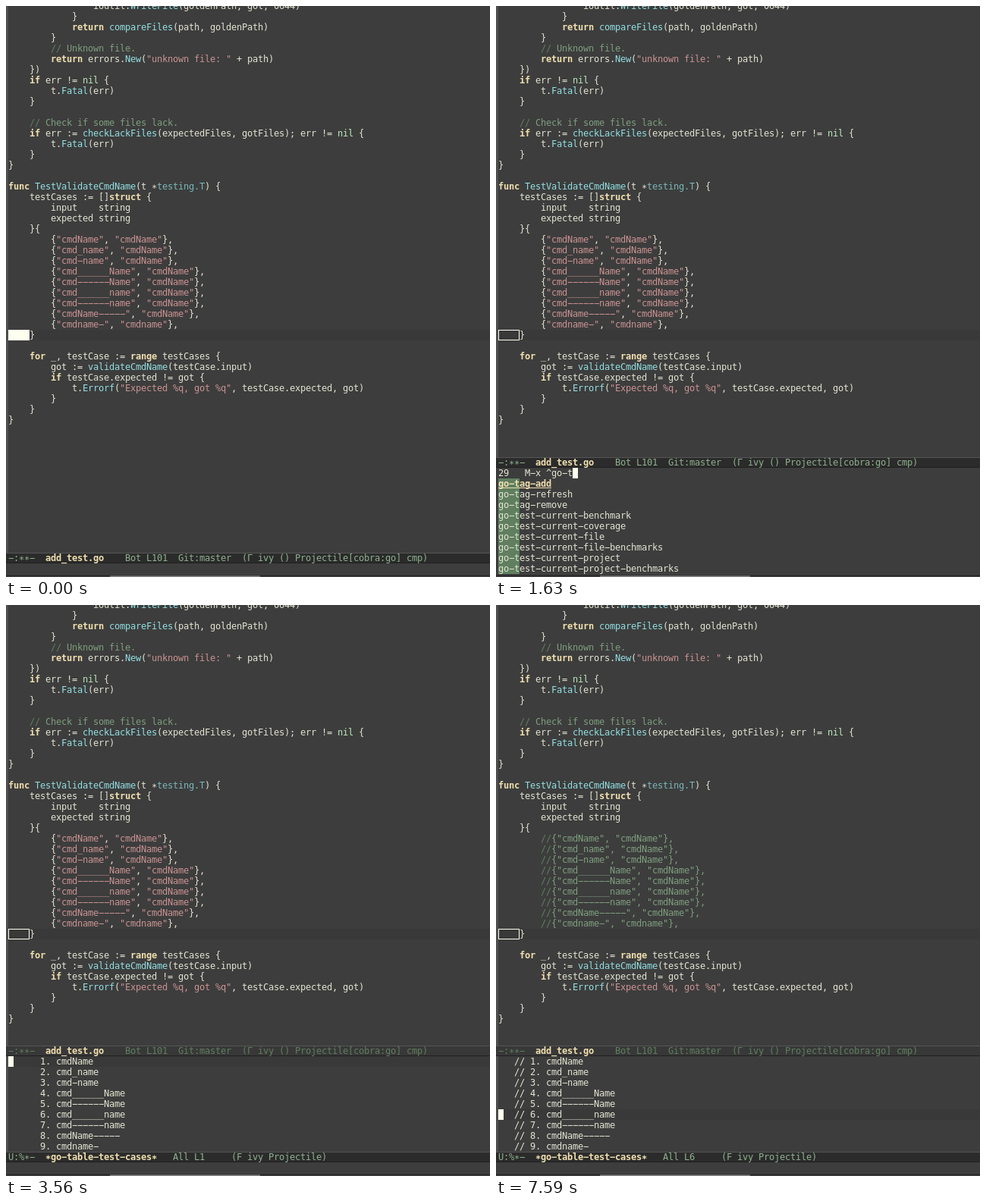
An HTML page with a canvas for the animation above (8 s loop, 638 px wide and 753 px high).

```html
<!DOCTYPE html>
<html lang="en">
<head>
<meta charset="utf-8">
<style>
  html, body { margin: 0; width: 100%; height: 100%; overflow: hidden; background: #3d3d3d; }
  canvas { display: block; }
</style>
</head>
<body>
<canvas id="stage" width="638" height="753"></canvas>
<script>
const ctx = document.getElementById('stage').getContext('2d');
const LOOP = 8000, WIDTH = 638, LEFT = 3, CELL = 7, LINE = 14;

const color = {
  bg: '#3d3d3d', currentLine: '#393939', fringe: '#4f4f4f',
  text: '#e4e4d4', cursor: '#ffffef', keyword: '#f0dfaf', string: '#cc9393',
  func: '#93e0e3', type: '#7cb8bb', constant: '#bfebbf',
  comment: '#7f9f7f', delimiter: '#5f7f5f', match: '#5f7f5f',
  mode: '#8fb28f', modeBg: '#2b2b2b', idle: '#5f7f5f', idleBg: '#383838'
};

const cases = [
  ['cmdName', 'cmdName'], ['cmd_name', 'cmdName'], ['cmd-name', 'cmdName'],
  ['cmd______Name', 'cmdName'], ['cmd------Name', 'cmdName'],
  ['cmd______name', 'cmdName'], ['cmd------name', 'cmdName'],
  ['cmdName-----', 'cmdName'], ['cmdname-', 'cmdname']
];

const codeBefore = `                ioutil.WriteFile(goldenPath, got, 0644)
            }
            return compareFiles(path, goldenPath)
        }
        // Unknown file.
        return errors.New("unknown file: " + path)
    })
    if err != nil {
        t.Fatal(err)
    }

    // Check if some files lack.
    if err := checkLackFiles(expectedFiles, gotFiles); err != nil {
        t.Fatal(err)
    }
}

func TestValidateCmdName(t *testing.T) {
    testCases := []struct {
        input    string
        expected string
    }{`.split('\n');

const codeAfter = `    }

    for _, testCase := range testCases {
        got := validateCmdName(testCase.input)
        if testCase.expected != got {
            t.Errorf("Expected %q, got %q", testCase.expected, got)
        }
    }
}`.split('\n');

const commandLists = {
  all: ['2C-associate-buffer', '2C-two-columns (C-x 6 2, C-x 6 s, <f2> 2, <f2> s)', '5x5',
    '5x5-crack', '5x5-crack-mutating-best', '5x5-crack-mutating-current',
    '5x5-crack-randomly', '5x5-crack-xor-mutate', 'Buffer-menu'],
  go: ['go-add-tags', 'go-coverage', 'go-download-play', 'go-eldoc-setup',
    'go-fill-struct (C-c C-s)', 'go-gen-test-all', 'go-gen-test-dwim',
    'go-gen-test-exported', 'go-goto-arguments (C-c C-f a)'],
  test: ['go-tag-add', 'go-tag-refresh', 'go-tag-remove', 'go-test-current-benchmark',
    'go-test-current-coverage', 'go-test-current-file', 'go-test-current-file-benchmarks',
    'go-test-current-project', 'go-test-current-project-benchmarks'],
  table: ['go-ttest (C-c C-t C-t)', ...['add-case', 'comment-all-case', 'comment-case',
    'delete-all-case', 'delete-case', 'only-case', 'uncomment-all-case', 'uncomment-case']
    .map(name => 'go-ttest--buf-' + name)]
};

// Each entry: start time, typed text, match count, command list
const typing = [
  [440, '', 5643, 'all'], [1330, 'go', 106, 'go'], [1480, 'go-', 102, 'go'],
  [1630, 'go-t', 29, 'test'], [1780, 'go-tt', 16, 'table'],
  [1930, 'go-tte', 16, 'table'], [2080, 'go-ttest', 16, 'table']
];

// Each entry: start time, selected line of the case list
const moves = [
  [2370, 1], [3420, 2], [3560, 1], [4160, 2], [4610, 3], [4750, 4],
  [4900, 5], [5640, 6], [5790, 8], [7440, 7], [7590, 6]
];

const commentTime = { 2: 4310, 5: 5340, 8: 6090 };
const isCommented = (n, t) => t >= (commentTime[n] || 6840);
const latest = (steps, t) => steps.filter(step => step[0] <= t).pop();
const rowY = row => row * LINE - 7;
const colX = col => LEFT + col * CELL;

function rect(x, y, w, h, fill) {
  ctx.fillStyle = fill;
  ctx.fillRect(x, y, w, h);
}

// Puts text on the character grid and returns the column after it.
function put(text, col, y, fill = color.text, bold = false) {
  ctx.font = (bold ? 'bold ' : '') + '12px "DejaVu Sans Mono", monospace';
  ctx.fillStyle = fill;
  for (const ch of text) {
    const glyph = ch === '-' ? '\u2212' : ch === '*' ? '\u2217' : ch;
    if (ch !== ' ') ctx.fillText(glyph, colX(col), y + 11);
    col++;
  }
  return col;
}

const tokens = /(\/\/ ?)(.*)|("[^"]*")|\b(func|if|for|range|struct|return)\b|\b(nil)\b|(testing\.T)|(\w+)(?=\()/g;

function putCode(line, y) {
  let end = 0;
  for (const m of line.matchAll(tokens)) {
    put(line.slice(end, m.index), end, y);
    end = m.index + m[0].length;
    if (m[1]) {
      const col = put(m[1], m.index, y, color.delimiter);
      put(m[2], col, y, color.comment);
    } else {
      const fill = m[3] ? color.string : m[4] ? color.keyword : m[5] ? color.constant
        : m[6] ? color.type : color.func;
      put(m[0], m.index, y, fill, Boolean(m[4]));
    }
  }
  put(line.slice(end), end, y);
}

function modeLine(y, status, name, rest, active = true) {
  const fill = active ? color.mode : color.idle;
  rect(0, y, WIDTH, LINE, active ? color.modeBg : color.idleBg);
  rect(0, y, WIDTH, 1, '#555555');
  rect(0, y + LINE - 1, WIDTH, 1, '#202020');
  put(status, 0, y, fill);
  const col = put(name, 7, y, color.keyword, true);
  put(rest, col, y, fill);
}

function fileModeLine(y, active) {
  modeLine(y, '-:**-', 'add_test.go',
    '    Bot L101  Git:master  (Γ ivy () Projectile[cobra:go] cmp)', active);
}

function drawCode(t) {
  rect(LEFT, 427, WIDTH - LEFT, LINE, color.currentLine);
  const rows = cases.map(([input, expected], i) =>
    `        ${isCommented(i + 1, t) ? '//' : ''}{"${input}", "${expected}"},`);
  [...codeBefore, ...rows, ...codeAfter].forEach((line, i) => putCode(line, rowY(i)));
  if (t < 290) {
    rect(LEFT, 427, 4 * CELL, LINE, color.cursor);
  } else {
    ctx.strokeStyle = color.cursor;
    ctx.lineWidth = 1;
    ctx.strokeRect(LEFT + .5, 427.5, 4 * CELL - 1, LINE - 1);
  }
}

function drawCommands(t) {
  const [, typed, count, list] = latest(typing, t);
  fileModeLine(595, true);
  const end = put(String(count).padEnd(5) + 'M-x ^' + typed, 0, 609);
  if (t < 880 || t >= 1330) rect(colX(end), 609, CELL, LINE, color.cursor);
  commandLists[list].forEach((command, i) => {
    const y = 623 + i * LINE;
    rect(LEFT, y, typed.length * CELL, LINE, color.match);
    if (i === 0) {
      put(command, 0, y, color.keyword, true);
      rect(LEFT, y + 12, command.length * CELL, 1, color.keyword);
      return;
    }
    const [name, keys] = command.split(' (');
    let col = put(name, 0, y);
    if (keys) {
      col = put(' (', col, y);
      col = put(keys.slice(0, -1), col, y, color.keyword, true);
      put(')', col, y);
    }
  });
}

function drawCaseList(t) {
  const line = latest(moves, t)[1];
  const cursorY = 595 + (line - 1) * LINE;
  fileModeLine(581, false);
  rect(LEFT, cursorY, WIDTH - LEFT, LINE, color.currentLine);
  cases.forEach(([input], i) => {
    const mark = isCommented(i + 1, t) ? '// ' : '   ';
    put(`${mark}${i + 1}. ${input}`, 3, 595 + i * LINE);
  });
  if (t < 2970 || t >= 3420) rect(LEFT, cursorY, CELL, LINE, color.cursor);
  modeLine(721, 'U:%*-', '*go-table-test-cases*', `   All L${line}     (F ivy Projectile)`);
}

function drawBottomEdge() {
  rect(0, 749, WIDTH, 1, '#4a4a4a');
  rect(0, 750, WIDTH, 1, '#222222');
  rect(0, 751, WIDTH, 2, '#383838');
  rect(137, 751, 198, 2, '#777777');
}

function draw(t) {
  rect(0, 0, WIDTH, 753, color.bg);
  rect(0, 0, LEFT, 735, color.fringe);
  drawCode(t);
  if (t >= 2370) {
    drawCaseList(t);
  } else if (t >= 440) {
    rect(0, 609, LEFT, 140, color.bg);
    drawCommands(t);
  } else {
    fileModeLine(721, true);
    if (t >= 290) {
      const end = put('5643 M-x ^', 0, 735);
      rect(colX(end), 735, CELL, LINE, color.cursor);
    }
  }
  drawBottomEdge();
}

const start = performance.now();
function tick() {
  draw((performance.now() - start) % LOOP);
  requestAnimationFrame(tick);
}
tick();
</script>
</body>
</html>
```
